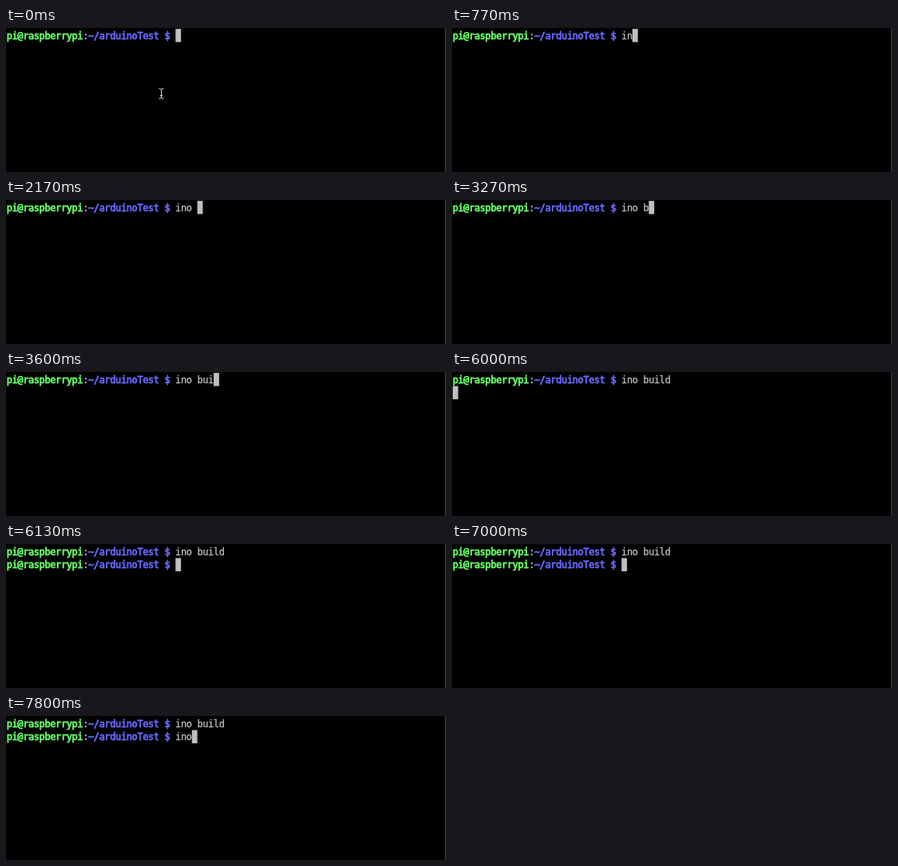
An HTML page with a canvas for the animation above (8000 ms loop, 551 px wide and 180 px high).

```html
<!DOCTYPE html>
<html>
<head>
<meta charset="utf-8">
<style>
  html, body { margin: 0; height: 100%; overflow: hidden; background: #000; }
  canvas { display: block; }
</style>
</head>
<body>
<canvas id="stage" width="551" height="180"></canvas>
<script>
const ctx = document.getElementById('stage').getContext('2d');
const LOOP = 8000, CELL = 6.82, LEFT = 0.9, TOP = 1.1, LINE = 16.5;
const GREEN = '#66ff66', BLUE = '#6666f8', GREY = '#c4c4c4';
const REGULAR = 0.25, BOLD = 0.8; // outline widths that thicken the letters
const PROMPT_LENGTH = 31;

// Times at which each character of a command appears
const firstKeys = [730, 770, 1770, 2170, 3270, 3430, 3600, 3800, 3870];
const secondKeys = [7170, 7370, 7800];
const ENTER = 4230, READY = 6100, POINTER_GONE = 470;

const typed = (text, keys, t) => text.slice(0, keys.filter(k => t >= k).length);

function write(text, col, row, color, weight) {
  ctx.font = '12px "DejaVu Sans Mono", monospace';
  ctx.fillStyle = ctx.strokeStyle = color;
  ctx.lineWidth = weight;
  ctx.lineJoin = 'round';
  [...text].forEach((ch, i) => {
    const x = LEFT + (col + i) * CELL - 0.2, y = 13.6 + row * LINE;
    ctx.fillText(ch, x, y);
    ctx.strokeText(ch, x, y);
  });
}

function commandLine(row, command) {
  write('pi@raspberrypi', 0, row, GREEN, BOLD);
  write(':', 14, row, GREY, REGULAR);
  write('~/arduinoTest $', 15, row, BLUE, BOLD);
  write(command, PROMPT_LENGTH, row, GREY, REGULAR);
}

function cursor(col, row) {
  ctx.fillStyle = '#bfbfbf';
  ctx.fillRect(LEFT + col * CELL, TOP + row * LINE, CELL, LINE);
}

function pointer() {
  ctx.strokeStyle = '#d8d8d8';
  ctx.lineWidth = 1;
  ctx.stroke(new Path2D('M191.5 75.5Q194.5 75.5 194.5 78V86Q194.5 88.5 191.5 88.5' +
    'M197.5 75.5Q194.5 75.5 194.5 78M194.5 86Q194.5 88.5 197.5 88.5M193 84.5H196'));
}

function draw(t) {
  ctx.fillStyle = '#000';
  ctx.fillRect(0, 0, 551, 180);
  ctx.fillStyle = '#4a4a4a';
  ctx.fillRect(550, 0, 1, 180);

  const first = typed('ino build', firstKeys, t);
  commandLine(0, first);
  if (t < ENTER) {
    cursor(PROMPT_LENGTH + first.length, 0);
  } else if (t < READY) {
    cursor(0, 1);
  } else {
    const second = typed('ino', secondKeys, t);
    commandLine(1, second);
    cursor(PROMPT_LENGTH + second.length, 1);
  }
  if (t < POINTER_GONE) pointer();
}

function tick() {
  draw(performance.now() % LOOP);
  requestAnimationFrame(tick);
}
tick();
</script>
</body>
</html>
```
